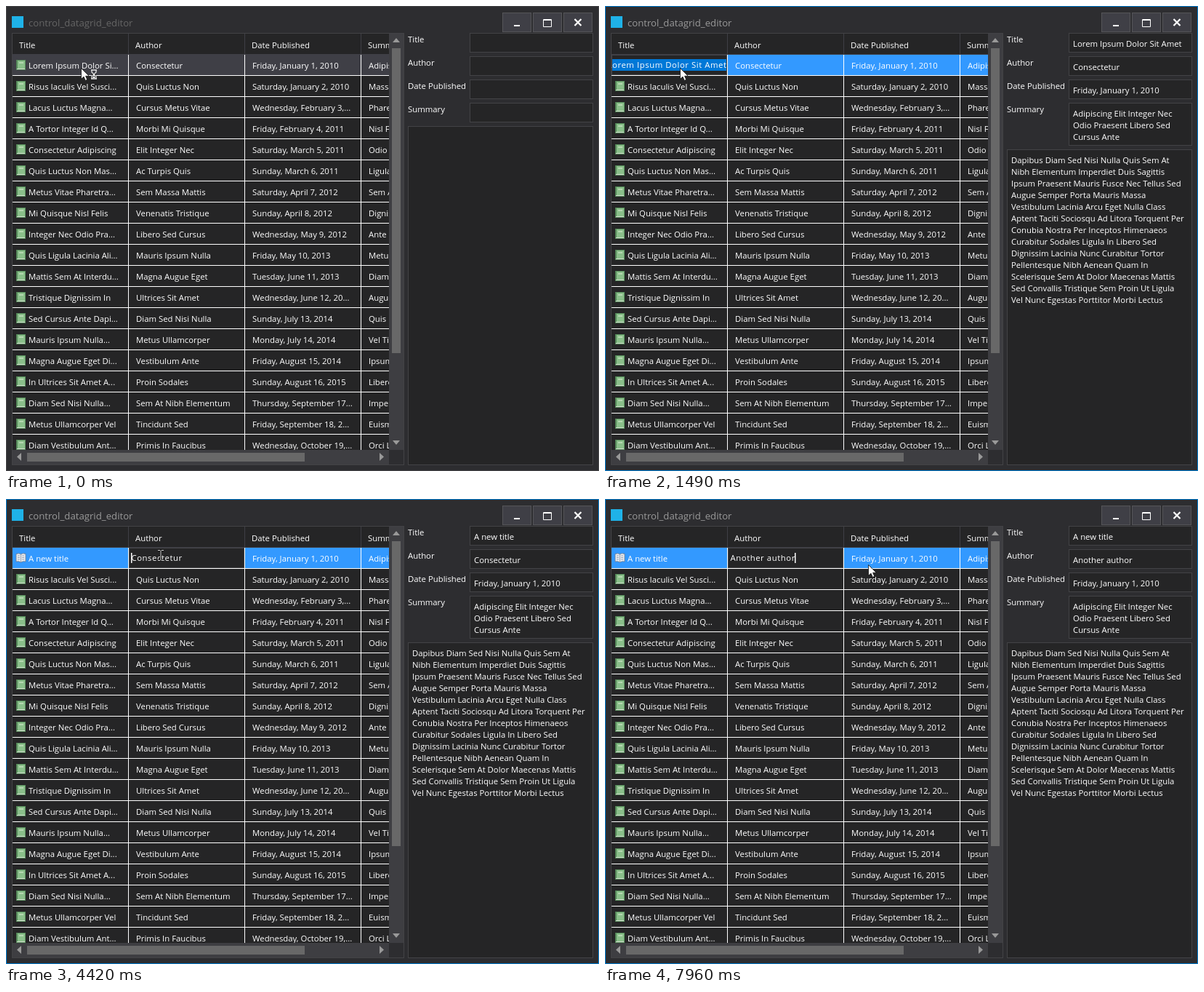
Animation of 816 by 639 pixels, one loop 8 s. Source, as an HTML page:

```html
<!DOCTYPE html>
<html lang="en">
<head>
<meta charset="utf-8">
<title>Data grid editor</title>
<style>
  html, body { margin: 0; width: 100%; height: 100%; overflow: hidden; background: #2d2d30; }
  svg { display: block; }
  text { font: 11.35px "Open Sans", "Noto Sans", sans-serif; fill: #fff; white-space: pre; }
  .caption { font-size: 13.2px; }
  .edit { letter-spacing: .55px; }
</style>
</head>
<body>
<svg id="stage" width="816" height="639" viewBox="0 0 816 639"></svg>
<script>
const LOOP = 8000;
const ROW_TOP = 67, ROW_HEIGHT = 29;
const COLUMNS = [9, 169, 329, 489];
const FULL_TITLE = 'Lorem Ipsum Dolor Sit Amet';

const BOOKS = `Lorem Ipsum Dolor Si...|Consectetur|Friday, January 1, 2010|Adipiscing
Risus Iaculis Vel Susci...|Quis Luctus Non|Saturday, January 2, 2010|Massa
Lacus Luctus Magna...|Cursus Metus Vitae|Wednesday, February 3,...|Pharetra
A Tortor Integer Id Q...|Morbi Mi Quisque|Friday, February 4, 2011|Nisl Felis
Consectetur Adipiscing|Elit Integer Nec|Saturday, March 5, 2011|Odio
Quis Luctus Non Mas...|Ac Turpis Quis|Sunday, March 6, 2011|Ligula
Metus Vitae Pharetra...|Sem Massa Mattis|Saturday, April 7, 2012|Sem At
Mi Quisque Nisl Felis|Venenatis Tristique|Sunday, April 8, 2012|Dignissim
Integer Nec Odio Pra...|Libero Sed Cursus|Wednesday, May 9, 2012|Ante
Quis Ligula Lacinia Ali...|Mauris Ipsum Nulla|Friday, May 10, 2013|Metus
Mattis Sem At Interdu...|Magna Augue Eget|Tuesday, June 11, 2013|Diam
Tristique Dignissim In|Ultrices Sit Amet|Wednesday, June 12, 20...|Augue
Sed Cursus Ante Dapi...|Diam Sed Nisi Nulla|Sunday, July 13, 2014|Quis
Mauris Ipsum Nulla...|Metus Ullamcorper|Monday, July 14, 2014|Vel Tincidunt
Magna Augue Eget Di...|Vestibulum Ante|Friday, August 15, 2014|Ipsum
In Ultrices Sit Amet A...|Proin Sodales|Sunday, August 16, 2015|Libero
Diam Sed Nisi Nulla...|Sem At Nibh Elementum|Thursday, September 17...|Imperdiet
Metus Ullamcorper Vel|Tincidunt Sed|Friday, September 18, 2...|Euismod
Diam Vestibulum Ant...|Primis In Faucibus|Wednesday, October 19,...|Orci Luctus`
  .split('\n').map(line => line.split('|'));

const SUMMARY = ['Adipiscing Elit Integer Nec', 'Odio Praesent Libero Sed', 'Cursus Ante'];
const BODY = `Dapibus Diam Sed Nisi Nulla Quis Sem At
Nibh Elementum Imperdiet Duis Sagittis
Ipsum Praesent Mauris Fusce Nec Tellus Sed
Augue Semper Porta Mauris Massa
Vestibulum Lacinia Arcu Eget Nulla Class
Aptent Taciti Sociosqu Ad Litora Torquent Per
Conubia Nostra Per Inceptos Himenaeos
Curabitur Sodales Ligula In Libero Sed
Dignissim Lacinia Nunc Curabitur Tortor
Pellentesque Nibh Aenean Quam In
Scelerisque Sem At Dolor Maecenas Mattis
Sed Convallis Tristique Sem Proin Ut Ligula
Vel Nunc Egestas Porttitor Morbi Lectus`.split('\n');

// Timeline, in milliseconds
const ACTIVATE = 160, TITLE_EDIT = 210, READY = 290, TITLE_SELECT = 1020, TITLE_COMMIT = 2710;
const AUTHOR_FOCUS = 3790, AUTHOR_EDIT = 3830, AUTHOR_SELECT = 4790;
const TITLE_KEYS = [1620, 1760, 1930, 1970, 2050, 2090, 2270, 2350, 2440, 2530, 2610];
const AUTHOR_KEYS = [5340, 5420, 5500, 5570, 5650, 5740, 5820, 5910, 6590, 6680, 6760, 6840, 6930, 7020];
const CARET_TOGGLES = [210, 480, 980, 1490, 1620, 2710, 3830, 3920, 4420, 4930, 5340, 6410, 6590, 7340, 7840];
const POINTER = [
  [0, 103, 85], [3350, 144, 90], [3390, 165, 89], [3440, 182, 87], [3480, 195, 84],
  [3530, 204, 81], [3570, 210, 79], [3610, 213, 77], [3920, 213, 77, 'beam'],
  [7800, 222, 78, 'beam'], [7840, 249, 80, 'beam'], [7880, 290, 84, 'beam'],
  [7920, 335, 88], [7960, 362, 90]
];

const passed = (times, t) => times.filter(time => time <= t).length;
const typed = (word, keys, fallback, t) => word.slice(0, passed(keys, t)) || fallback;

const meter = document.createElement('canvas').getContext('2d');
function editWidth(string) {
  meter.font = '11.35px "Open Sans", "Noto Sans", sans-serif';
  return meter.measureText(string).width + string.length * .55;
}

const rect = (x, y, w, h, fill) => `<rect x="${x}" y="${y}" width="${w}" height="${h}" fill="${fill}"/>`;
const frame = (x, y, w, h, stroke, fill = 'none') =>
  `<rect x="${x + .5}" y="${y + .5}" width="${w - 1}" height="${h - 1}" fill="${fill}" stroke="${stroke}"/>`;
const text = (x, y, string, attrs = '') => `<text x="${x}" y="${y}" ${attrs}>${string}</text>`;
const path = (d, attrs) => `<path d="${d}" ${attrs}/>`;
const clip = (x, y, w, h, content) => `<svg x="${x}" y="${y}" width="${w}" height="${h}">${content}</svg>`;
const move = (x, y, content) => `<g transform="translate(${x} ${y})">${content}</g>`;

const closedBook = y => move(14, y,
  rect(0, 0, 13, 14, '#568a5a') + rect(2, 1, 10, 11, '#8abf8a') +
  rect(4, 3, 6, 2, '#b5d8b1') + rect(1, 12, 11, 1, '#d5dfd2'));

const openBook = y => move(14, y,
  path('M0 1.5Q4 0 6.5 2 9 0 13 1.5V12Q9 11 6.5 13 4 11 0 12Z', 'fill="#e9edf2" stroke="#6a7688" stroke-width=".8"') +
  path('M6.5 2V12.5M2 4H5M2 6.5H5M2 9H5M8 4H11M8 6.5H11M8 9H11', 'stroke="#8190a5" stroke-width=".8"'));

function gridRow(cells, index, icon = closedBook, fill = '#252526') {
  const top = ROW_TOP + index * ROW_HEIGHT;
  return rect(9, top, 518, 28, fill) + icon(top + 7) +
    cells.map((cell, i) => text(i ? COLUMNS[i] + 10 : 31, top + 19, cell)).join('') +
    rect(9, top + 28, 518, 1, '#fff') +
    [168, 328, 488].map(x => rect(x, top, 1, 29, '#fff')).join('');
}

const inGrid = content => clip(0, 0, 527, 610, content);

function windowButtons() {
  return [683, 725, 767].map(x => frame(x, 9, 40, 27, '#555558', '#3f3f46')).join('') +
    rect(699, 26, 8, 2, '#fff') +
    path('M739.5 18.5H750.5V28.5H739.5ZM739 19.5H751', 'fill="none" stroke="#fff"') +
    path('M782.5 18L791.5 27M791.5 18L782.5 27', 'stroke="#fff" stroke-width="2.2"');
}

function scrollBars() {
  return rect(527, 38, 20, 572, '#3e3e42') + rect(531, 58, 12, 419, '#686868') +
    rect(9, 610, 518, 20, '#3e3e42') + rect(29, 614, 382, 12, '#686868') +
    path('M532 50L537 44 542 50ZM532 597H542L537 603ZM21 614V625L15 619.5ZM514 614V625L520 619.5Z', 'fill="#999"');
}

const backdrop = rect(0, 0, 816, 639, '#2d2d30') + rect(8, 14, 16, 16, '#1fb2e8') + windowButtons() +
  rect(8, 37, 540, 594, '#252526') + rect(527, 610, 20, 20, '#2d2d30') +
  inGrid(['Title', 'Author', 'Date Published', 'Summary'].map((name, i) => text(COLUMNS[i] + 9, 58, name)).join('') +
    [168, 328, 488].map(x => rect(x, 38, 1, 29, '#3f3f46')).join('') + rect(9, 66, 518, 1, '#3f3f46') +
    BOOKS.slice(1).map((book, i) => gridRow(book, i + 1)).join('')) +
  scrollBars() +
  ['Title', 'Author', 'Date Published', 'Summary'].map((name, i) => text(553, 50 + 32 * i, name)).join('');

function details(active, title, author) {
  const box = (x, y, w, h) => frame(x, y, w, h, '#434346', '#252526');
  const summaryHeight = active ? 59 : 27;
  const bodyTop = active ? 197 : 165;
  const boxes = [37, 69, 101].map(y => box(638, y, 170, 27)).join('') +
    box(638, 133, 170, summaryHeight) + box(553, bodyTop, 255, 631 - bodyTop);
  if (!active) return boxes;
  return boxes + text(644, 56, title) + text(644, 88, author) + text(644, 120, BOOKS[0][2]) +
    SUMMARY.map((line, i) => text(644, 152 + 16 * i, line)).join('') +
    BODY.map((line, i) => text(559, 216 + 16 * i, line)).join('');
}

// Inline editor that covers one cell; a selection keeps the end of the value in view.
function editor(column, value, selected, caretAtEnd, caretOn) {
  const width = editWidth(value);
  const start = selected ? Math.min(3.5, 158.5 - width) : 3.5;
  const caretX = Math.min(start + (caretAtEnd ? width : 0) - 1, 157);
  return clip(COLUMNS[column], ROW_TOP, 159, 28,
    frame(0, 0, 159, 28, '#434346', '#252526') +
    (selected ? rect(Math.max(start, 1), 6, Math.min(width, 157), 16, '#0078d7') : '') +
    text(start, 18, value, 'class="edit"') +
    (caretOn ? rect(Math.round(caretX), 7, 1.5, 14, '#fff') : ''));
}

function pointer(t) {
  const [, x, y, shape] = POINTER[passed(POINTER.map(p => p[0]), t) - 1];
  if (shape) {
    const beam = 'M-4 -6.5H-1L0 -5.5 1 -6.5H4M0 -5.5V6.5M-4 7.5H-1L0 6.5 1 7.5H4';
    return move(x, y, path(beam, 'fill="none" stroke="#111" stroke-width="2.4"') +
      path(beam, 'fill="none" stroke="#d8d8d8"'));
  }
  const glass = path('M14 3H22M14 15H22M15 3.5V6L18 9 15 12V14.5M21 3.5V6L18 9 21 12V14.5',
    'fill="#222" stroke="#e4e4e4" stroke-width="1.3"') + path('M16 14L18 11 20 14Z', 'fill="#fff"');
  return move(x, y,
    path('M.5 .5V15.3L4 12.2 6.3 17.4 8.8 16.3 6.6 11.3H11.3Z', 'fill="#fff" stroke="#111" stroke-width=".8"') +
    (t < READY ? glass : ''));
}

function scene(t) {
  const active = t >= ACTIVATE;
  const editingTitle = t >= TITLE_EDIT && t < TITLE_COMMIT;
  const editingAuthor = t >= AUTHOR_EDIT;
  const editing = editingTitle || editingAuthor;
  const title = typed('A new title', TITLE_KEYS, FULL_TITLE, t);
  const author = typed('Another author', AUTHOR_KEYS, BOOKS[0][1], t);
  const caretOn = passed(CARET_TOGGLES, t) % 2 === 1;

  const cells = [t < TITLE_COMMIT ? BOOKS[0][0] : title, author, ...BOOKS[0].slice(2)];
  let row = gridRow(cells, 0, active ? openBook : closedBook, active ? '#3399ff' : '#3f3f46');
  if (editingTitle) {
    row += editor(0, title, t >= TITLE_SELECT && t < TITLE_KEYS[0], t >= TITLE_SELECT, caretOn);
  } else if (editingAuthor) {
    row += editor(1, author, t >= AUTHOR_SELECT && t < AUTHOR_KEYS[0], t >= AUTHOR_SELECT, caretOn);
  } else if (active) {
    const x = COLUMNS[t < AUTHOR_FOCUS ? 0 : 1];
    row += `<rect x="${x + 1}" y="68" width="157" height="26" fill="none" stroke="#ca6f14" stroke-width="2"/>`;
  }

  return backdrop + inGrid(row) +
    text(31, 28, 'control_datagrid_editor', `class="caption" style="fill:${active ? '#999' : '#656565'}"`) +
    frame(8, 37, 540, 594, active && !editing ? '#007acc' : '#434346') +
    details(active, title, author) +
    frame(0, 0, 816, 639, active ? '#007acc' : '#434346') +
    pointer(t);
}

const stage = document.getElementById('stage');
const startTime = performance.now();
let shown = '';

function draw() {
  const markup = scene((performance.now() - startTime) % LOOP);
  if (markup !== shown) stage.innerHTML = shown = markup;
  requestAnimationFrame(draw);
}
draw();
</script>
</body>
</html>
```
